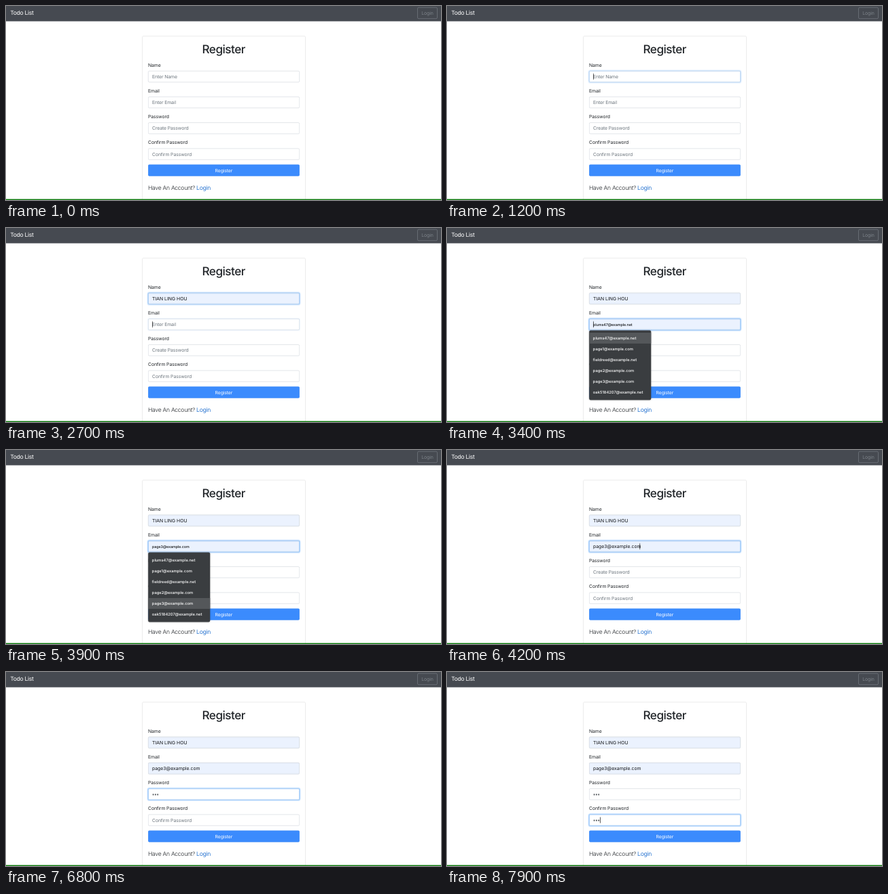
Write an HTML page that moves like this. It is 640x287 px and loops after 8000 ms.

```html
<!DOCTYPE html>
<html lang="en">
<head>
<meta charset="utf-8">
<title>Register form</title>
<style>
html, body { margin: 0; width: 100%; height: 100%; overflow: hidden; background: #fff; }
svg.stage { display: block; width: 100vw; height: 100vh; }
text {
  font: 400 6.87px Inter, "Noto Sans CJK TC", "Noto Sans CJK SC", "Noto Sans CJK", sans-serif;
  letter-spacing: -.016em; fill: #212529; text-rendering: geometricPrecision;
}
.mid { text-anchor: middle; }
.brand { font-size: 8.58px; letter-spacing: -.036em; fill: #fff; }
.title { font-size: 17.15px; font-weight: 500; letter-spacing: -.029em; }
.lead { font-size: 8.58px; font-weight: 300; letter-spacing: -.033em; }
.link { fill: #2e78d2; font-weight: 400; }
.hint { fill: #6c757d; }
.value { fill: #101214; letter-spacing: 0; }
.preview text { font-size: 5.4px; font-weight: 500; fill: #101214; }
.popup { filter: drop-shadow(0 .5px .8px rgba(0, 0, 0, .3)); }
.popup text { font-size: 5.8px; font-weight: 500; letter-spacing: 0; fill: #fff; }
.popup .dim { fill: #a6a8aa; }
.panel { fill: #3a3d40; }
.hover { fill: #54575a; }
.dots { stroke: #33383d; stroke-width: 2; stroke-linecap: round; }

/* every state change is a hard cut in an 8 s loop; focus rings fade */
.cut { animation: 8s step-end infinite; }
.ring { animation: 8s ease infinite; }

@keyframes ringName { 0%, 14.375% { opacity: 0 } 16.25%, 33.5% { opacity: 1 } 35.375%, 100% { opacity: 0 } }
@keyframes ringEmail { 0%, 33.5% { opacity: 0 } 35.375%, 61% { opacity: 1 } 63.25%, 100% { opacity: 0 } }
@keyframes ringPass { 0%, 61% { opacity: 0 } 63.25%, 88.5% { opacity: 1 } 90.375%, 100% { opacity: 0 } }
@keyframes ringConfirm { 0%, 88.5% { opacity: 0 } 90.375%, 100% { opacity: 1 } }

@keyframes nameHint { 0% { opacity: 1 } 23.75% { opacity: 0 } }
@keyframes nameFill { 0% { opacity: 0 } 23.75% { opacity: 1 } }
@keyframes namePreview { 0% { opacity: 0 } 23.75% { opacity: 1 } 27.5% { opacity: 0 } }
@keyframes nameValue { 0% { opacity: 0 } 27.5% { opacity: 1 } }
@keyframes namePopup { 0% { opacity: 0 } 16.25% { opacity: 1 } 27.5% { opacity: 0 } }

@keyframes emailHint { 0% { opacity: 1 } 42.5% { opacity: 0 } }
@keyframes emailFill { 0% { opacity: 0 } 42.5% { opacity: 1 } }
@keyframes emailValue { 0% { opacity: 0 } 52.5% { opacity: 1 } }
@keyframes emailPopup { 0% { opacity: 0 } 35% { opacity: 1 } 52.5% { opacity: 0 } }
@keyframes pick {
  0% { opacity: 0; transform: none }
  42.5% { opacity: 1; transform: translateY(0) }
  43.75% { transform: translateY(var(--row)) }
  45% { transform: translateY(calc(var(--row) * 2)) }
  46.25% { transform: translateY(calc(var(--row) * 3)) }
  47.5% { transform: translateY(calc(var(--row) * 5)) }
  48.75% { transform: translateY(calc(var(--row) * 4)) }
  52.5% { opacity: 0 }
}

@keyframes passHint { 0% { opacity: 1 } 72.5% { opacity: 0 } }
@keyframes confirmHint { 0% { opacity: 1 } 91.25% { opacity: 0 } }
@keyframes passDots {
  0% { opacity: 0; stroke-dasharray: 0px 99px }
  72.5% { opacity: 1; stroke-dasharray: 0px 99px }
  75% { stroke-dasharray: 0px 3.3px 0px 99px }
  78.75% { stroke-dasharray: 0px 3.3px 0px 3.3px 0px 99px }
}
@keyframes confirmDots {
  0% { opacity: 0; stroke-dasharray: 0px 99px }
  91.25% { opacity: 1; stroke-dasharray: 0px 99px }
  95% { stroke-dasharray: 0px 3.3px 0px 99px }
  98.75% { stroke-dasharray: 0px 3.3px 0px 3.3px 0px 99px }
}

@keyframes caret {
  0% { opacity: 0; transform: none }
  15% { opacity: 1; transform: translate(215px, 104.4px) }
  21.25% { opacity: 0 }
  27.5% { opacity: 1; transform: translate(268px, 104.4px) }
  33.75% { opacity: 1; transform: translate(215px, 142.6px) }
  40% { opacity: 0 }
  42.5% { opacity: 1 }
  48.75% { opacity: 0 }
  52.5% { opacity: 1; transform: translate(283.2px, 142.6px) }
  58.75% { opacity: 0 }
  61.25% { opacity: 1; transform: translate(215px, 180.8px) }
  67.5% { opacity: 0 }
  72.5% { opacity: 1; transform: translate(218.4px, 180.8px) }
  75% { transform: translate(221.7px, 180.8px) }
  78.75% { transform: translate(225px, 180.8px) }
  85% { opacity: 0 }
  88.75% { opacity: 1; transform: translate(215px, 219.1px) }
  91.25% { transform: translate(218.4px, 219.1px) }
  95% { transform: translate(221.7px, 219.1px) }
  98.75% { transform: translate(225px, 219.1px) }
}
</style>
</head>
<body>
<svg class="stage" viewBox="0 0 640 287" preserveAspectRatio="none">
  <defs>
    <rect id="box" x="209.3" y="-8.2" width="222.4" height="16.4" rx="1.6"/>
    <g id="field"><use href="#box" fill="#fff" stroke="#ced4da" stroke-width=".6"/></g>
    <g id="filled"><use href="#box" fill="#ebf2fe" stroke="#ced4da" stroke-width=".6"/></g>
    <g id="focus" fill="none">
      <rect x="208.4" y="-9.1" width="224.2" height="18.2" rx="2.4" stroke="#007bff" stroke-opacity=".25" stroke-width="1.42"/>
      <use href="#box" stroke="#80bdff" stroke-width=".7"/>
    </g>
  </defs>

  <rect width="640" height="287" fill="#fff"/>
  <rect width="640" height="22.6" fill="#464a51"/>
  <text class="brand" x="6.2" y="13.4">Todo List</text>
  <rect x="605.5" y="2.2" width="29" height="16.5" rx="1.7" fill="none" stroke="#7d848b" stroke-width=".6"/>
  <text class="mid" x="620" y="13" style="fill:#7f858b">Login</text>

  <rect x="200.5" y="44.5" width="240" height="260" rx="1.8" fill="#fff" stroke="#000" stroke-opacity=".125" stroke-width=".6"/>
  <text class="title mid" x="320.2" y="70.4">Register</text>

  <text x="209" y="89.7">Name</text>
  <text x="209" y="127.9">Email</text>
  <text x="209" y="166.1">Password</text>
  <text x="209" y="204.3">Confirm Password</text>

  <!-- name -->
  <g transform="translate(0 104.4)">
    <use href="#field"/>
    <use class="cut" style="animation-name:nameFill" href="#filled"/>
    <use class="ring" style="animation-name:ringName" href="#focus"/>
    <text class="hint cut" style="animation-name:nameHint" x="215" y="2.5">Enter Name</text>
    <g class="preview cut" style="animation-name:namePreview"><text x="215" y="2.4">TIAN LING HOU</text></g>
    <text class="value cut" style="animation-name:nameValue" x="215" y="2.5">TIAN LING HOU</text>
  </g>

  <!-- email -->
  <g transform="translate(0 142.6)">
    <use href="#field"/>
    <use class="cut" style="animation-name:emailFill" href="#filled"/>
    <use class="ring" style="animation-name:ringEmail" href="#focus"/>
    <text class="hint cut" style="animation-name:emailHint" x="215" y="2.5">Enter Email</text>
    <svg x="210" y="-8" width="220" height="16">
      <g class="preview cut" style="animation-name:pick;--row:-16px">
        <text x="5" y="10.4">plums47@example.net</text>
        <text x="5" y="26.4">page1@example.com</text>
        <text x="5" y="42.4">fieldreed@example.net</text>
        <text x="5" y="58.4">page2@example.com</text>
        <text x="5" y="74.4">page3@example.com</text>
        <text x="5" y="90.4">oak5184207@example.net</text>
      </g>
    </svg>
    <text class="value cut" style="animation-name:emailValue" x="215" y="2.5">page3@example.com</text>
  </g>

  <!-- password -->
  <g transform="translate(0 180.8)">
    <use href="#field"/>
    <use class="ring" style="animation-name:ringPass" href="#focus"/>
    <text class="hint cut" style="animation-name:passHint" x="215" y="2.5">Create Password</text>
    <path class="dots cut" style="animation-name:passDots" d="M216.6 .5h8"/>
  </g>

  <!-- confirm -->
  <g transform="translate(0 219.1)">
    <use href="#field"/>
    <use class="ring" style="animation-name:ringConfirm" href="#focus"/>
    <text class="hint cut" style="animation-name:confirmHint" x="215" y="2.5">Confirm Password</text>
    <path class="dots cut" style="animation-name:confirmDots" d="M216.6 .5h8"/>
  </g>

  <rect x="209.2" y="234.7" width="222.6" height="16.7" rx="1.7" fill="#3b8bfd" stroke="#2f80f2" stroke-width=".4"/>
  <text class="mid" x="320.4" y="245.5" style="fill:#fff">Register</text>
  <text class="lead" x="209" y="271.6">Have An Account? <tspan class="link">Login</tspan></text>

  <rect class="cut" style="animation-name:caret" x="0" y="-4.4" width=".7" height="8.8" fill="#111"/>

  <g class="popup cut" style="animation-name:namePopup">
    <rect class="panel" x="209.2" y="113.2" width="86" height="57.6" rx="2"/>
    <path d="M209.2 152h86v16.8a2 2 0 0 1-2 2h-82a2 2 0 0 1-2-2z" fill="#484b4e"/>
    <rect class="hover cut" style="animation-name:namePreview" x="209.2" y="117" width="86" height="16"/>
    <text x="214.8" y="127.2">TIAN LING HOU</text>
    <text x="214.8" y="143.2">柳雲禾</text>
    <text class="dim" x="214.8" y="163.7">管理...</text>
  </g>

  <g class="popup cut" style="animation-name:emailPopup">
    <rect class="panel" x="209.2" y="151.4" width="91" height="103.2" rx="2"/>
    <rect class="hover cut" style="animation-name:pick;--row:16px" x="209.2" y="155" width="91" height="16"/>
    <text x="214.8" y="165.2">plums47@example.net</text>
    <text x="214.8" y="181.2">page1@example.com</text>
    <text x="214.8" y="197.2">fieldreed@example.net</text>
    <text x="214.8" y="213.2">page2@example.com</text>
    <text x="214.8" y="229.2">page3@example.com</text>
    <text x="214.8" y="245.2">oak5184207@example.net</text>
  </g>

  <rect y="285.6" width="640" height="1.4" fill="#0b7a0b"/>
</svg>
</body>
</html>
```
